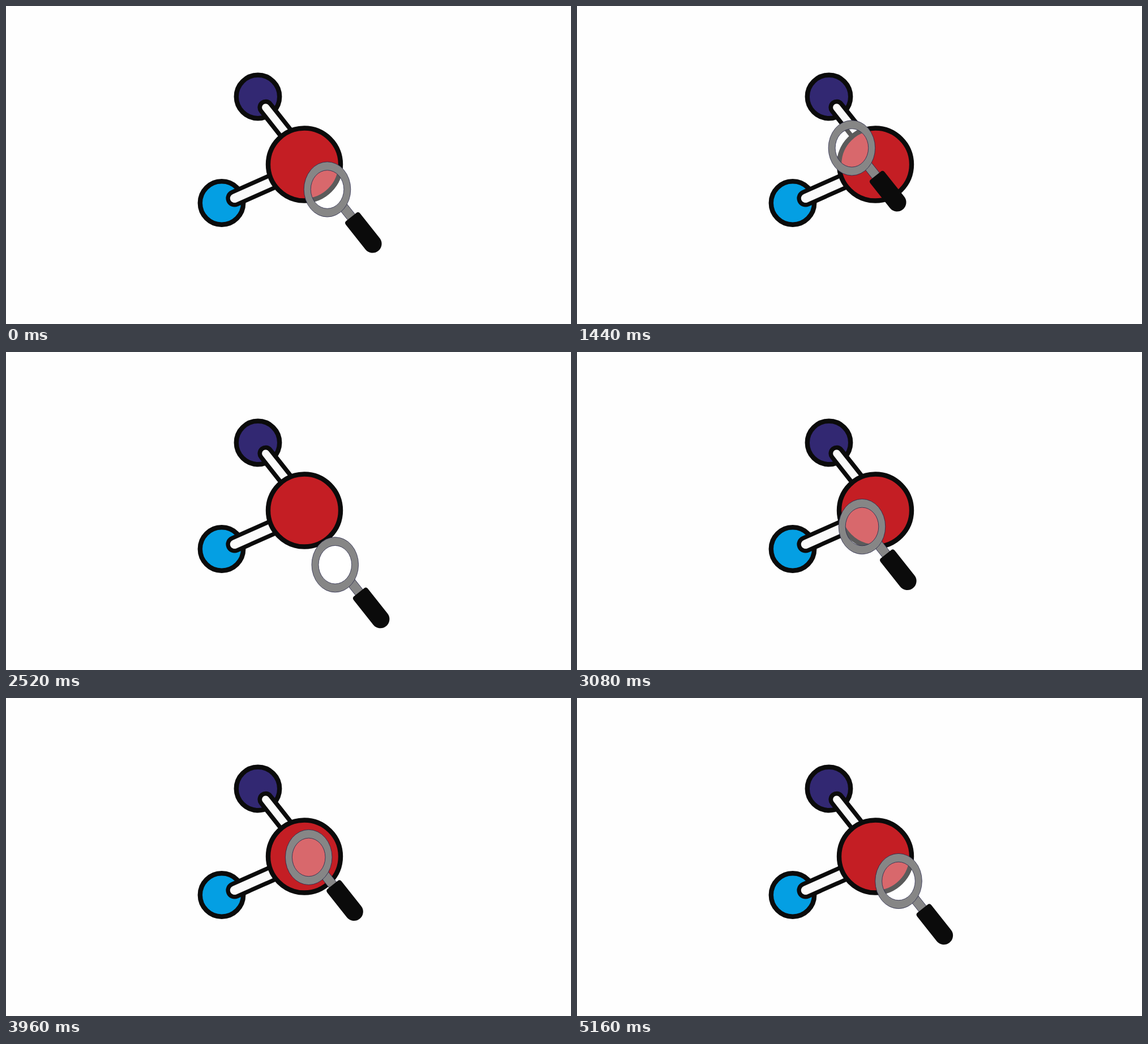
An HTML page that plays this animation: 998 by 561 pixels, repeating every 5200 ms.

```html
<!DOCTYPE html>
<html lang="en">
<head>
<meta charset="utf-8">
<title>Molecule and magnifier</title>
<style>
  html, body { margin: 0; width: 100%; height: 100%; overflow: hidden; background: #fefefe; }
  svg { display: block; width: 100vw; height: 100vh; }
  .atom { stroke: #0b0b0b; stroke-width: 8.4; }
  .bond { stroke-linecap: round; fill: none; }
  .outer { stroke: #0b0b0b; }
  .inner { stroke: #fafafa; }
  .metal { fill: #868686; stroke: #26264a; stroke-width: .8; }
</style>
</head>
<body>
<svg viewBox="0 0 998 561">
  <circle class="atom" cx="445" cy="160" r="38.2" fill="#322872"/>
  <circle class="atom" cx="381" cy="347.5" r="38.2" fill="#049fe3"/>
  <g class="bond">
    <path class="outer" stroke-width="28.5" d="M458.7 179L510 244"/>
    <path class="inner" stroke-width="13.2" d="M458.7 179L510 244"/>
    <path class="outer" stroke-width="30.5" d="M403.7 339.2L500 296.5"/>
    <path class="inner" stroke-width="15.8" d="M403.7 339.2L500 296.5"/>
  </g>
  <circle class="atom" cx="527" cy="279.5" r="64" fill="#c41e24"/>
  <g id="magnifier">
    <ellipse rx="30" ry="34.5" fill="#fff" fill-opacity=".33"/>
    <g transform="translate(80 96) rotate(51.5)">
      <rect class="metal" x="-86" y="-8.2" width="32" height="16.4"/>
      <path fill="#0b0b0b" d="M0 -16.1A16.1 16.1 0 0 1 0 16.1H-55.5Q-60.5 16.1 -60.5 11.1V-11.1Q-60.5 -16.1 -55.5 -16.1Z"/>
    </g>
    <path class="metal" fill-rule="evenodd"
      d="M-41.3 0A41.3 48.6 0 1 1 41.3 0A41.3 48.6 0 1 1 -41.3 0ZM-29.3 0A29.3 33.8 0 1 1 29.3 0A29.3 33.8 0 1 1 -29.3 0Z"/>
  </g>
</svg>
<script>
  const LOOP = 5200, STEP = 40;
  // turning points of the wandering lens: time in ms, then its centre
  const path = [
    [0, 567.5, 323.5], [560, 560.5, 265.5], [840, 546, 240.5], [1200, 512, 223.5],
    [1680, 465, 290], [2000, 476, 355.5], [2240, 535, 374.5], [2500, 580, 377],
    [2800, 574, 331.5], [3080, 503.5, 308], [3190, 482.5, 297], [3360, 531, 282],
    [3520, 572.5, 267.5], [3640, 582, 263.5], [3920, 540, 279], [4120, 520.5, 287.5],
    [4440, 538, 298.5], [5160, 568, 323]
  ];
  const last = path.length - 1;
  const magnifier = document.getElementById("magnifier");

  function slope(i, axis) {
    const a = path[Math.max(i - 1, 0)], b = path[Math.min(i + 1, last)];
    return (b[axis] - a[axis]) / (b[0] - a[0]);
  }

  // cubic Hermite curve through the turning points
  function place(t, axis) {
    let i = 0;
    while (i < last - 1 && t >= path[i + 1][0]) i++;
    const a = path[i], b = path[i + 1], span = b[0] - a[0];
    const u = Math.min((t - a[0]) / span, 1), v = 1 - u;
    return a[axis] * v * v * (1 + 2 * u) + b[axis] * u * u * (3 - 2 * u)
      + span * u * v * (slope(i, axis) * v - slope(i + 1, axis) * u);
  }

  let start;
  function draw(now) {
    start ??= now;
    const t = Math.floor(((now - start) % LOOP) / STEP) * STEP;
    magnifier.setAttribute("transform", `translate(${place(t, 1)} ${place(t, 2)})`);
    requestAnimationFrame(draw);
  }
  draw(performance.now());
</script>
</body>
</html>
```
